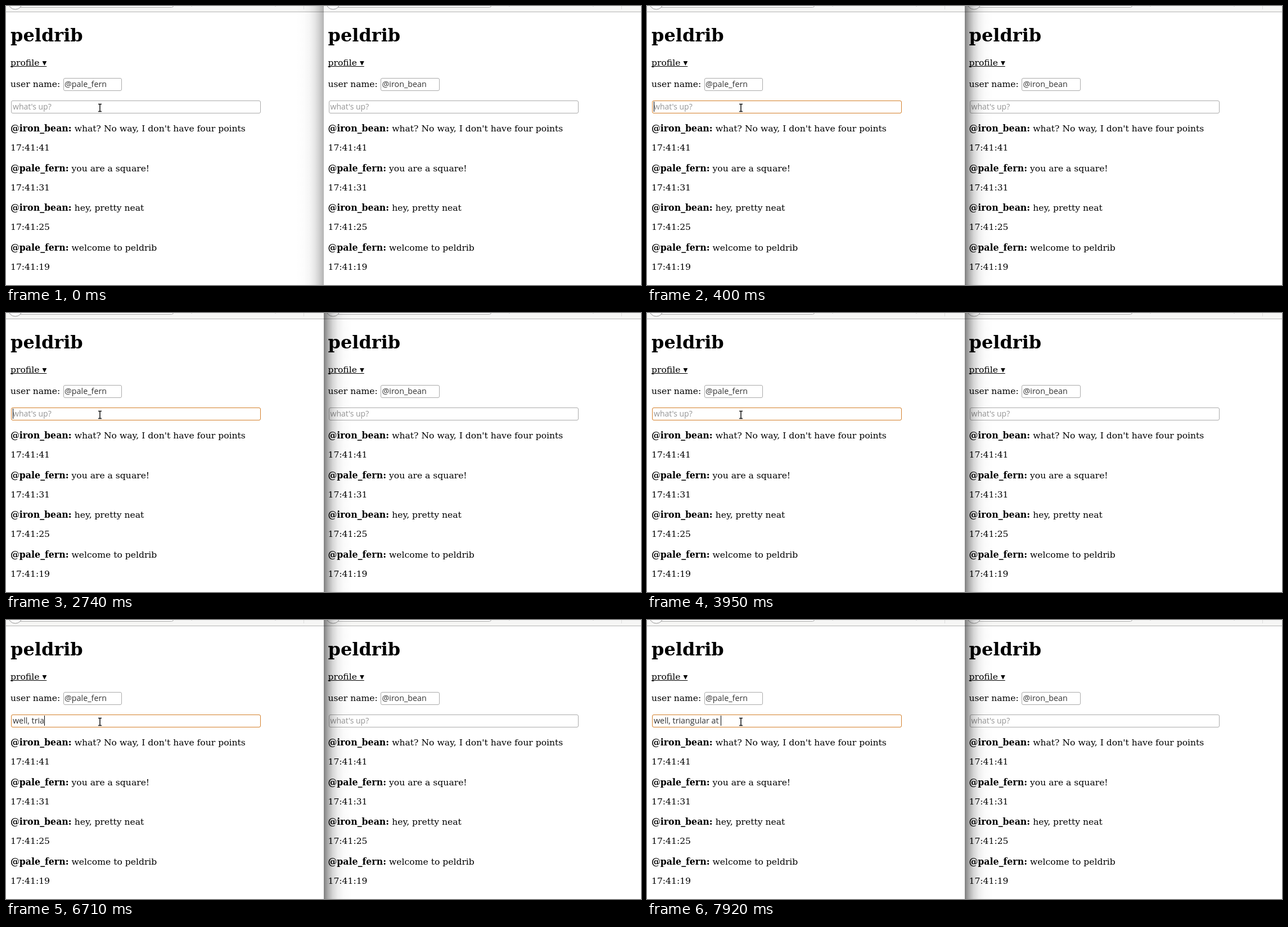
Recreate the animation shown at these times as an HTML page. Size 1129 by 496 pixels, loop 7990 ms.

```html
<!DOCTYPE html>
<html lang="en">
<head>
<meta charset="utf-8">
<title>Chat</title>
<style>
html, body { margin: 0; width: 100%; height: 100%; overflow: hidden; background: #fff; }
body { position: relative; color: #000; font: 15.6px/19px "DejaVu Serif", "DejaVu Sans", serif; }
div, svg, h1 { position: absolute; margin: 0; white-space: pre; box-sizing: border-box; }
svg { left: 0; top: 0; }
b { font-size: 15.8px; }
.window { top: 0; width: 565px; height: 496px; overflow: hidden; }
h1 { left: 8px; top: 33px; font-size: 32px; line-height: 38px; }
.profile { text-decoration: underline 1px; text-underline-offset: 1px; text-decoration-skip-ink: none; }
.field { height: 23px; border: 1px solid #aaa; border-radius: 3px; }
.focus { border-color: #d58432; box-shadow: inset 0 0 1px #e9b784; }
.value { font: 14.3px/19px "Open Sans", "Noto Sans", sans-serif; color: #333; }
.hint { font-size: 14px; color: #959595; }
#caret { display: inline-block; vertical-align: top; width: 1px; height: 18px; margin-top: 1px; background: #000; }
#shadow {
  left: 565px; top: 0; width: 50px; height: 496px;
  background: linear-gradient(90deg, rgba(0,0,0,.5), rgba(0,0,0,.31) 16%, rgba(0,0,0,.16) 32%,
    rgba(0,0,0,.065) 50%, rgba(0,0,0,.02) 70%, transparent);
}
#shadow.left { left: 515px; transform: scaleX(-1); opacity: .6; }
</style>
</head>
<body>
<script>
const LOOP = 7990;
const MESSAGE = "well, triangular at ";
// [time in ms, letters typed]
const KEYS = [
  [4500, 1], [4590, 2], [4670, 3], [4830, 4], [6710, 10], [6840, 11], [6970, 12], [7150, 13],
  [7290, 14], [7390, 15], [7480, 16], [7580, 17], [7670, 18], [7770, 19], [7920, 20]
];
const USERS = ["@pale_fern", "@iron_bean"];
const CHAT = [
  [1, "what? No way, I don't have four points", 41],
  [0, "you are a square!", 31],
  [1, "hey, pretty neat", 25],
  [0, "welcome to peldrib", 19]
];

const line = (x, baseline, html, cls = "") =>
  `<div class="${cls}" style="left:${x}px;top:${baseline - 15}px">${html}</div>`;

const field = (x, y, w, cls = "") =>
  `<div class="field ${cls}" style="left:${x}px;top:${y}px;width:${w}px"></div>`;

const toolbar = `<svg width="565" height="11">
  <rect width="565" height="11" fill="#f6f6f5"/>
  <path d="M0 10.5H565" stroke="#b4b4b4"/>
  <path d="M20 -5V2.5H294.5Q297.5 2.5 297.5 -1V-5" fill="#fff" stroke="#aaa"/>
  <circle cx="16.5" cy="-6.5" r="12.5" fill="#fbfbfb" stroke="#999"/>
  <path d="M529.5 0V6M329 .5h2M478 .5h2" stroke="#dcdcdc"/>
</svg>`;

const chat = CHAT.map(([user, text, sec], i) => {
  const y = Math.round(70.6 * i);
  return line(8, 223 + y, `<b>${USERS[user]}:</b> ${text}`) + line(8, 258 + y, `17:41:${sec}`);
}).join("");

const page = (user, i) => `<div class="window" style="left:${564.5 * i}px">
  ${toolbar}<h1>peldrib</h1>
  ${line(8, 107, "profile ▾", "profile")}
  ${line(8, 145, "user name:")}
  ${field(101.5, 128, 104.5)}${line(104, 144, user, "value")}
  ${field(9, 168, 444, "entry")}${line(12, 184, "what's up?", "value hint")}
  ${chat}
</div>`;

const beam = "M164 174.5H170M167 174.5V187.5M164 187.5H170";

document.body.innerHTML = USERS.map(page).join("")
  + line(12, 184, '<span id="typed"></span><i id="caret"></i>', "value")
  + `<div id="shadow"></div>
  <svg width="565" height="200" fill="none">
    <path d="${beam}" stroke="#fff" stroke-width="3.4"/>
    <path d="${beam}" stroke="#111" stroke-width="1.5"/>
  </svg>`;

const $ = s => document.querySelector(s);
const entry = $(".entry"), hint = $(".hint"), typed = $("#typed"), caret = $("#caret"), shadow = $("#shadow");

function draw(t) {
  const count = KEYS.reduce((n, [at, letters]) => t >= at ? letters : n, 0);
  const caretOn = (t >= 400 && t < 1550) || (t >= 2740 && t < 3950) || t >= 4500;
  typed.textContent = MESSAGE.slice(0, count);
  hint.style.visibility = count ? "hidden" : "visible";
  caret.style.visibility = caretOn ? "visible" : "hidden";
  entry.classList.toggle("focus", t >= 400);
  shadow.classList.toggle("left", t < 300);
}

const start = performance.now();
function tick() {
  draw((performance.now() - start) % LOOP);
  requestAnimationFrame(tick);
}
tick();
</script>
</body>
</html>
```
